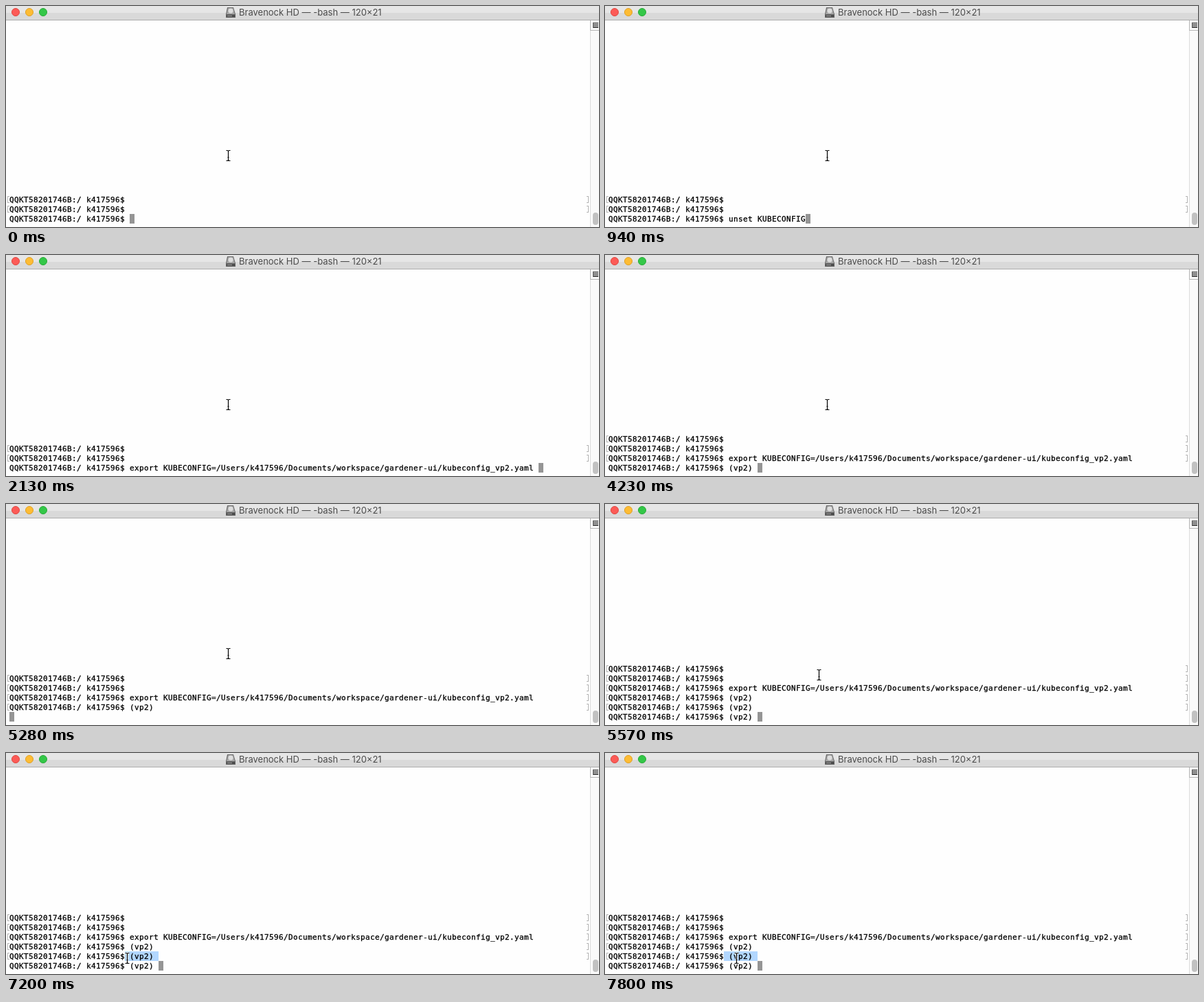
An HTML page with a canvas for the animation above (8 s loop, 863 px wide and 322 px high).

```html
<!DOCTYPE html>
<html lang="en">
<head>
<meta charset="utf-8">
<title>Terminal session</title>
<style>
html, body { margin: 0; width: 863px; height: 322px; overflow: hidden; background: #fefefe; }
canvas { display: block; }
</style>
</head>
<body>
<canvas id="stage" width="863" height="322"></canvas>
<script>
const ctx = document.getElementById('stage').getContext('2d');
const LOOP = 8000, CELL = 7, ROW = 14, LEFT = 5, LAST_ROW = 303;
const POINTER_STEP = 150, DRAG_START = 6600, DRAG_END = 7200;
const PROMPT = 'QQKT58201746B:/ k417596$ ';
const EXPORT = 'export KUBECONFIG=/Users/k417596/Documents/workspace/gardener-ui/kubeconfig_vp2.yaml ';
const VP = PROMPT + '(vp2) ';

// Lines enter at the bottom; "edit" replaces the line being typed
const log = [[0, PROMPT], [0, PROMPT], [0, PROMPT]];
const edits = [
  [500, 'clear'], [940, 'unset KUBECONFIG'], [1390, 'clear'],
  [1690, 'kubectl get configmap'], [2130, EXPORT]
].map(([time, text]) => [time, PROMPT + text, 'edit']);
log.push(...edits, [4230, VP], [5280, ''], [5420, VP, 'edit'], [5570, VP]);

// Pointer path: time, stem x, top y
const path = [
  [5450, 323, 210], [5700, 289, 297], [5850, 236, 340], [6000, 183, 304], [6450, 219, 292],
  [DRAG_START, 219, 292], [DRAG_END, 176, 291], [7350, 176, 291], [LOOP - 200, 191, 291]
];

const beam = new Path2D('M.5 .5h1.5q1.5 0 1.5 1.5v12q0 1.5-1.5 1.5H.5M6.5 .5H5q-1.5 0-1.5 1.5v12q0 1.5 1.5 1.5h1.5M2.5 10.5h2');

const clamp = (v, low, high) => Math.min(high, Math.max(low, v));

function linesAt(t) {
  const lines = [];
  for (const [time, text, edit] of log) {
    if (time > t) break;
    if (edit) lines.pop();
    lines.push(text);
  }
  return lines;
}

function pointerAt(time) {
  const t = clamp(time, path[0][0], path.at(-1)[0]);
  const i = Math.max(1, path.findIndex(key => key[0] >= t));
  const [from, to] = [path[i - 1], path[i]];
  const u = (t - from[0]) / (to[0] - from[0]);
  const ease = u * u * (3 - 2 * u);
  return [1, 2].map(k => from[k] + (to[k] - from[k]) * ease);
}

function rect(color, x, y, w, h) {
  ctx.fillStyle = color;
  ctx.fillRect(x, y, w, h);
}

function shape(color, build, rim) {
  ctx.fillStyle = color;
  ctx.beginPath();
  build();
  ctx.fill();
  if (!rim) return;
  ctx.strokeStyle = rim;
  ctx.lineWidth = 1;
  ctx.stroke();
}

function poly(color, ...points) {
  shape(color, () => points.forEach(([x, y]) => ctx.lineTo(x, y)));
}

function drawDisk() {
  poly('#666', [322, 2], [331, 2], [334, 12], [334, 17], [320, 17], [320, 12]);
  poly('#a6a6a6', [323, 3], [330.5, 3], [333, 12], [321, 12]);
  shape('#dedede', () => ctx.ellipse(327, 7, 3.5, 3.5, 0, 0, 7));
  rect('#4c4c4c', 321, 13, 12, 3);
  rect('#a8a8a8', 322, 14, 7, 1);
}

function drawWindow() {
  rect('#fefefe', 0, 0, 863, 322);
  rect('#e6e6e6', 0, 0, 863, 10);
  rect('#d9d9d9', 0, 10, 863, 10);
  rect('#acacac', 0, 20, 863, 1);
  [['#fc5b57', '#e2463f'], ['#fdbc34', '#e0a023'], ['#34c748', '#27ab36']].forEach(([color, rim], i) => {
    shape(color, () => ctx.arc(14 + 20 * i, 9, 5.5, 0, 7), rim);
  });
  drawDisk();
  ctx.font = '13px Inter, Roboto, sans-serif';
  ctx.fillStyle = '#4b4b4b';
  ctx.fillText('Bravenock HD — -bash — 120×21', 339, 14);

  rect('#fafafa', 850, 21, 13, 301);
  rect('#dcdcdc', 850, 21, 1, 301);
  rect('#b5b5b5', 850, 21, 1, 15);
  rect('#b5b5b5', 850, 35, 13, 1);
  rect('#555', 854, 24, 8, 8);
  for (let y = 25; y < 31; y += 2) rect('#c8c8c8', 855, y, 7, 1);
  shape('#c1c1c1', () => ctx.roundRect(854, 301, 8, 18, 4));
}

function drawBrackets(y) {
  [[2, 2], [845, 847]].forEach(([x, stem]) => {
    rect('#b3b3b3', stem, y, 1, 10);
    rect('#b3b3b3', x, y, 3, 1);
    rect('#b3b3b3', x, y + 9, 3, 1);
  });
}

function drawLine(line, y) {
  ctx.font = '11px "DejaVu Sans Mono", "Noto Sans Mono", monospace';
  ctx.fillStyle = ctx.strokeStyle = '#000';
  ctx.lineWidth = 0.3;
  [...line].forEach((char, n) => {
    ctx.fillText(char, LEFT + CELL * n, y + 11);
    ctx.strokeText(char, LEFT + CELL * n, y + 11);
  });
}

function drawSelection(t) {
  const [x] = pointerAt(clamp(t, DRAG_START, DRAG_END));
  const column = v => LEFT + CELL * Math.round((v - LEFT) / CELL);
  const end = LEFT + CELL * VP.length;
  rect('#b2d7ff', column(x), LAST_ROW - ROW, end - column(x), ROW);
}

function drawLines(lines) {
  const last = lines.length - 1;
  lines.forEach((line, i) => {
    const y = LAST_ROW - (last - i) * ROW;
    if (i === last) rect('#959595', LEFT + CELL * line.length, y, CELL, ROW);
    else drawBrackets(y + 2);
    drawLine(line, y);
  });
}

function drawPointer([x, y]) {
  ctx.save();
  ctx.translate(Math.round(x) - 3, Math.round(y));
  for (const [color, width] of [['#fff', 2.6], ['#000', 1.2]]) {
    ctx.strokeStyle = color;
    ctx.lineWidth = width;
    ctx.stroke(beam);
  }
  ctx.restore();
}

function draw(now) {
  const t = now % LOOP;
  const stepped = t - t % POINTER_STEP;
  drawWindow();
  drawSelection(stepped);
  drawLines(linesAt(t));
  drawPointer(pointerAt(stepped));
  requestAnimationFrame(draw);
}

requestAnimationFrame(draw);
</script>
</body>
</html>
```
